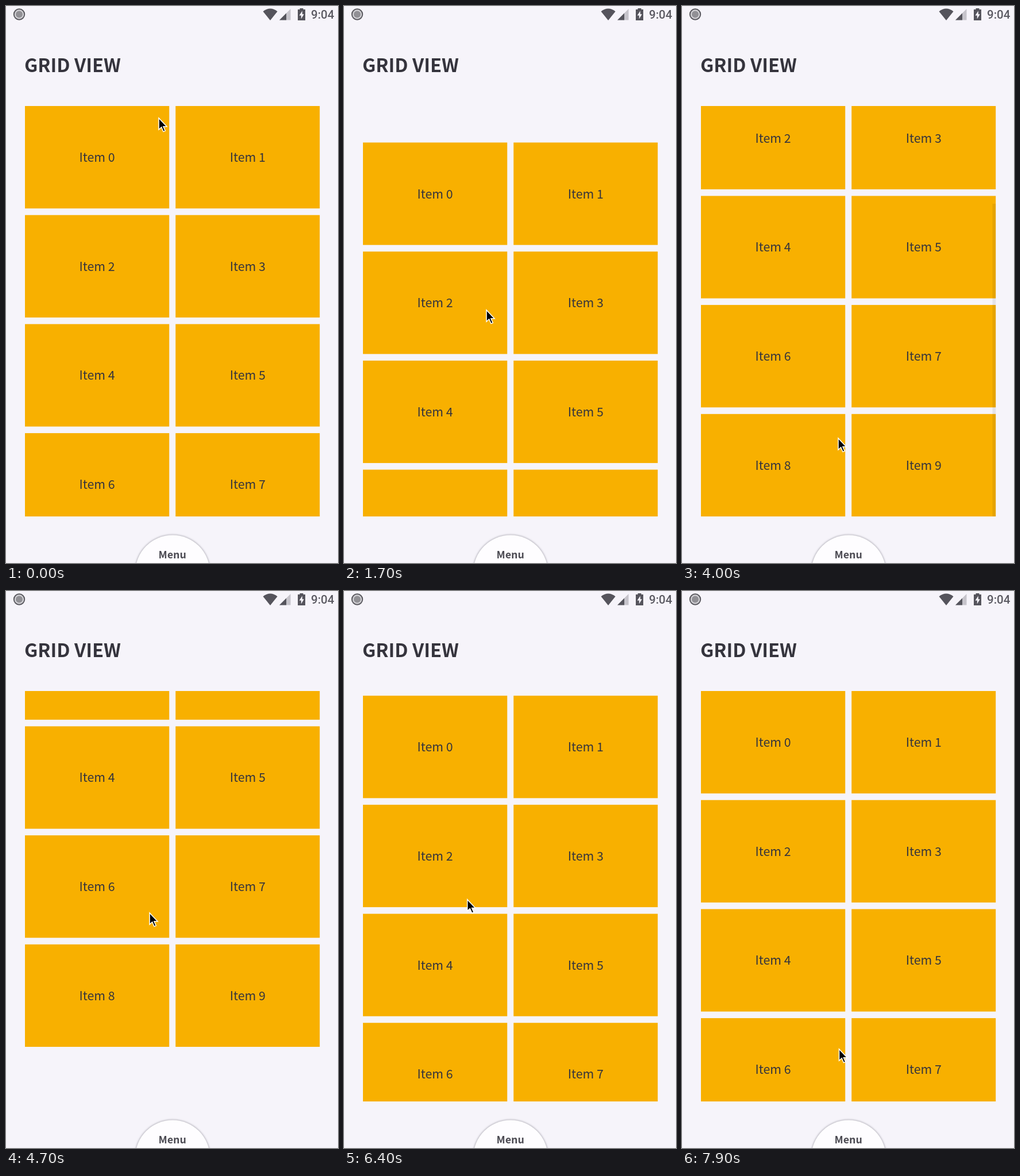
These frames come from a looping animation (578x969 px, 8 s). An HTML page:

```html
<!DOCTYPE html>
<html lang="en">
<head>
<meta charset="utf-8">
<title>Grid view</title>
<style>
  html, body { margin: 0; width: 100%; height: 100%; overflow: hidden; background: #f6f4fa; }
  svg { display: block; width: 100%; height: 100%; }
  text { font-family: 'Noto Sans CJK JP', 'Noto Sans CJK SC', 'Noto Sans', sans-serif; fill: #35343d; }
  .item { font-size: 21.3px; text-anchor: middle; }
  .title { font-size: 32.6px; font-weight: 700; }
  .menu { font-size: 17.8px; font-weight: 700; text-anchor: middle; fill: #4b4a52; }
  .clock { font: 500 20.5px Roboto, sans-serif; fill: #5a5961; }
  .tile { fill: #f8b000; }
  .icon { fill: #55545c; }
</style>
</head>
<body>
<svg viewBox="0 0 578 969">
  <defs>
    <clipPath id="view"><rect x="33" y="174" width="513.5" height="714"/></clipPath>
    <filter id="soft" x="-20%" y="-20%" width="140%" height="140%"><feGaussianBlur stdDeviation="1.6"/></filter>
  </defs>
  <rect width="578" height="969" fill="#f6f4fa"/>

  <g id="status">
    <circle cx="23" cy="14.5" r="9.2" fill="#d2d1d5" stroke="#5b5a60" stroke-width="2"/>
    <circle cx="23" cy="14.5" r="6" fill="#919095"/>
    <path class="icon" d="M447.5 9.5Q460 -0.5 472.5 9.5L460 25Z"/>
    <path d="M476 24.5H495.5V5Z" fill="#c6c4cb"/>
    <path class="icon" d="M476 24.5H488V12.5Z"/>
    <path class="icon" d="M511.5 4H517.5V6H521V25H508V6H511.5Z"/>
    <path d="M515.8 8.5L510.5 16.5H513.8V22.5L518.8 14.3H515.8Z" fill="#f6f4fa"/>
    <text class="clock" x="531" y="22">9:04</text>
  </g>

  <text class="title" x="32" y="115">GRID VIEW</text>

  <g clip-path="url(#view)">
    <g id="list"></g>
    <path id="glow" fill="#f5f3fa"/>
    <rect id="bar" x="540.5" width="6" fill="#000"/>
  </g>

  <circle cx="290" cy="985.5" r="66" fill="#8d8b95" opacity=".6" filter="url(#soft)"/>
  <circle cx="290" cy="985.5" r="65" fill="#fefdff"/>
  <text class="menu" x="289.7" y="961">Menu</text>

  <path id="cursor" d="M0 0V20L4.6 15.8L8 23.6L11.2 22.2L7.9 14.8H14Z" fill="#000" stroke="#fff" stroke-width="1.5"/>
</svg>
<script>
const LOOP = 8000, STEP = 100;
const TOP = 174, VIEW = 714, PITCH = 189.7, MAX = 223;
const $ = id => document.getElementById(id);

// Ten items in two columns
for (let i = 0; i < 10; i++) {
  const x = i % 2 ? 295.2 : 33, y = TOP + (i >> 1) * PITCH;
  $('list').insertAdjacentHTML('beforeend',
    `<rect class="tile" x="${x}" y="${y}" width="251.2" height="178.2"/>
     <text class="item" x="${x + 125.6}" y="${y + 97}">Item ${i}</text>`);
}

const linear = u => u;
const settle = u => 1 - (1 - u) ** 2;

// Keys: [time, value, easing into this key]
const scroll = [
  [0, 0], [1000, 0], [1700, 63.5], [2400, 105], [2910, 0, settle],
  [3000, 0], [3450, -MAX], [4150, -MAX], [4700, -MAX - 95], [5220, -MAX, settle],
  [5300, -MAX], [5680, 0], [5700, 7], [5750, 10], [6000, 0, settle],
  [6350, 0], [7000, 106], [7200, 126], [7270, 126], [7830, 0, settle]
];
const barAlpha = [
  [0, 0], [2950, 0], [3000, .32], [3800, .32], [4060, 0],
  [5250, 0], [5300, .32], [5950, .32], [6200, 0]
];
const glowSize = [[0, 0], [5600, 0], [5700, 1], [5800, 1], [6100, 0]];

// Pointer path: [time, x, y]
const path = [
  [0, 266, 195], [300, 432, 470], [500, 300, 812], [700, 146, 640], [900, 215, 430],
  [1000, 228, 409], [1700, 248, 529], [2400, 262, 612], [2800, 293.5, 773],
  [2950, 294, 780], [3450, 285, 470], [3600, 284, 450], [4000, 272, 752],
  [4100, 270, 760], [4700, 250, 560], [5300, 215, 290], [5700, 211, 535],
  [5900, 212, 560], [6350, 214, 521], [7000, 223, 724], [7200, 228, 762], [7900, 273.5, 797]
];
const pathX = path.map(([t, x]) => [t, x]);
const pathY = path.map(([t, , y]) => [t, y]);

function at(keys, t) {
  const i = keys.findIndex(k => k[0] > t);
  if (i < 0) return keys[keys.length - 1][1];
  const [t0, a] = keys[i - 1], [t1, b, ease = linear] = keys[i];
  return a + (b - a) * ease((t - t0) / (t1 - t0));
}

function draw(t) {
  const y = at(scroll, t);
  $('list').setAttribute('transform', `translate(0 ${y})`);

  // Thumb shrinks a little while the list is pulled past an edge
  const ratio = VIEW / (VIEW + MAX);
  const inside = Math.min(MAX, Math.max(0, -y));
  const over = Math.abs(y + inside);
  $('bar').setAttribute('y', TOP + inside * ratio);
  $('bar').setAttribute('height', VIEW * ratio - over / 2);
  $('bar').setAttribute('opacity', at(barAlpha, t));

  const g = at(glowSize, t);
  const side = TOP + 29 * g, dip = TOP + 69 * g;
  $('glow').setAttribute('d', `M33 ${TOP}V${side}Q289.7 ${dip} 546.5 ${side}V${TOP}Z`);
  $('glow').setAttribute('opacity', .34 * g);

  $('cursor').setAttribute('transform', `translate(${at(pathX, t)} ${at(pathY, t)})`);
}

const start = performance.now();
function tick() {
  const t = Math.max(0, performance.now() - start) % LOOP;
  draw(Math.floor(t / STEP) * STEP);
  requestAnimationFrame(tick);
}
tick();
</script>
</body>
</html>
```
